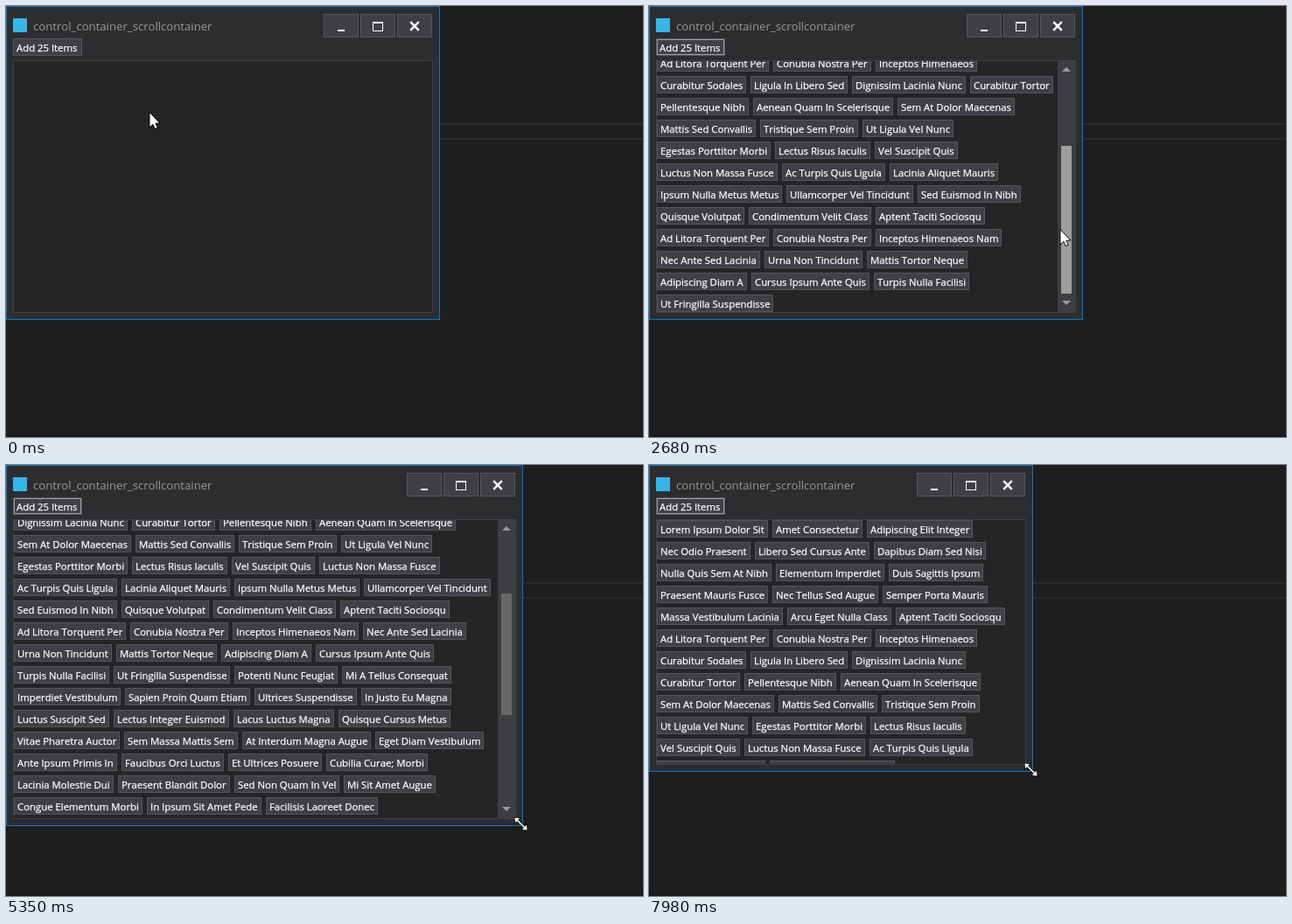
An HTML page with a canvas that plays this animation: 728x493 px, repeating every 8000 ms.

```html
<!DOCTYPE html>
<html lang="en">
<head>
<meta charset="utf-8">
<title>Scroll container</title>
<style>
html, body { margin: 0; width: 100%; height: 100%; overflow: hidden; background: #1e1e1e; }
canvas { display: block; }
</style>
</head>
<body>
<canvas id="stage" width="728" height="493"></canvas>
<script>
const ctx = document.getElementById('stage').getContext('2d');
const LOOP = 8000, STEP = 40, GAP = 5, HEIGHT = 20, ROW = HEIGHT + GAP, LEFT = 9, TOP = 63;
const GRIP = 3; // distance from the resize pointer to the window corner
const VIEW = 287; // list height before resizing
const LABEL = 11.35;
const FACE = '"Open Sans", "Noto Sans", sans-serif';
const C = {
  desk: '#1e1e1e', frame: '#2d2d30', panel: '#252526', face: '#3f3f46', edge: '#54545c',
  hover: '#54545c', hoverEdge: '#6a6a75', accent: '#007acc', bar: '#3e3e42'
};
ctx.fontKerning = 'none';

const setFont = px => { ctx.font = `${px}px ${FACE}`; };
setFont(LABEL);
const items = `Lorem Ipsum Dolor Sit,Amet Consectetur,Adipiscing Elit Integer,Nec Odio Praesent,
Libero Sed Cursus Ante,Dapibus Diam Sed Nisi,Nulla Quis Sem At Nibh,Elementum Imperdiet,
Duis Sagittis Ipsum,Praesent Mauris Fusce,Nec Tellus Sed Augue,Semper Porta Mauris,
Massa Vestibulum Lacinia,Arcu Eget Nulla Class,Aptent Taciti Sociosqu,Ad Litora Torquent Per,
Conubia Nostra Per,Inceptos Himenaeos,Curabitur Sodales,Ligula In Libero Sed,
Dignissim Lacinia Nunc,Curabitur Tortor,Pellentesque Nibh,Aenean Quam In Scelerisque,
Sem At Dolor Maecenas,Mattis Sed Convallis,Tristique Sem Proin,Ut Ligula Vel Nunc,
Egestas Porttitor Morbi,Lectus Risus Iaculis,Vel Suscipit Quis,Luctus Non Massa Fusce,
Ac Turpis Quis Ligula,Lacinia Aliquet Mauris,Ipsum Nulla Metus Metus,
Ullamcorper Vel Tincidunt,Sed Euismod In Nibh,Quisque Volutpat,Condimentum Velit Class,
Aptent Taciti Sociosqu,Ad Litora Torquent Per,Conubia Nostra Per,Inceptos Himenaeos Nam,
Nec Ante Sed Lacinia,Urna Non Tincidunt,Mattis Tortor Neque,Adipiscing Diam A,
Cursus Ipsum Ante Quis,Turpis Nulla Facilisi,Ut Fringilla Suspendisse,Potenti Nunc Feugiat,
Mi A Tellus Consequat,Imperdiet Vestibulum,Sapien Proin Quam Etiam,Ultrices Suspendisse,
In Justo Eu Magna,Luctus Suscipit Sed,Lectus Integer Euismod,Lacus Luctus Magna,
Quisque Cursus Metus,Vitae Pharetra Auctor,Sem Massa Mattis Sem,At Interdum Magna Augue,
Eget Diam Vestibulum,Ante Ipsum Primis In,Faucibus Orci Luctus,Et Ultrices Posuere,
Cubilia Curae; Morbi,Lacinia Molestie Dui,Praesent Blandit Dolor,Sed Non Quam In Vel,
Mi Sit Amet Augue,Congue Elementum Morbi,In Ipsum Sit Amet Pede,
Facilisis Laoreet Donec`.split(/,\s*/).map(label => (
  { label, w: Math.round(ctx.measureText(label).width) + 8 }
));

// Pointer moves: start, end, destination
const moves = [
  [0, 0, 164, 122],
  [30, 350, 36, 45],
  [1410, 2010, 479, 146],
  [2060, 2180, 479, 150],
  [2220, 2500, 470, 256],
  [2720, 3340, 36, 45],
  [3880, 4300, 505, 371],
  [4340, 4610, 483, 348],
  [4740, 4740, 493, 356],
  [5070, 5750, 721, 485],
  [6020, 6060, 721, 483],
  [6300, 6500, 650, 390],
  [6660, 6940, 695, 480],
  [7140, 7390, 721, 483],
  [7580, 7980, 436, 348]
];
const smooth = u => u * u * (3 - 2 * u);
const within = (t, a, b) => t >= a && t < b;
const clamp = (v, lo, hi) => Math.min(hi, Math.max(lo, v));

function pointerAt(t) {
  const i = moves.filter(m => m[0] <= t).length - 1;
  const [start, end, ...to] = moves[i];
  const from = moves[Math.max(0, i - 1)].slice(2);
  const steps = Math.floor((t - start) / STEP) + 1;
  const u = smooth(Math.min(1, steps * STEP / (end - start + STEP)));
  return to.map((v, n) => Math.round(from[n] + (v - from[n]) * u));
}

function layout(count, limit) {
  let x = LEFT, row = 0;
  const cells = items.slice(0, count).map(item => {
    if (x > LEFT && x + item.w > limit) { x = LEFT; row++; }
    const cell = { ...item, x, y: TOP + row * ROW };
    x += item.w + GAP;
    return cell;
  });
  return { cells, height: (row + 1) * ROW - GAP };
}

function state(t) {
  const [x, y] = pointerAt(t);
  const resizeTime = t < 5070 ? 5030 : within(t, 6300, 7580) ? 6260 : t;
  const [w, h] = pointerAt(resizeTime).map(v => v + GRIP);
  const count = 25 * [600, 1180, 3640].filter(added => t >= added).length;
  const bar = within(t, 1180, 6420);
  const kind = t < 4740 || within(t, 6300, 6860) ? 'arrow' : within(t, 6860, 7140) ? 'vertical' : 'diagonal';
  const dragY = pointerAt(Math.min(t, 2640))[1];
  const offset = t < 2060 || !bar ? 0 : Math.round(clamp((dragY - 146) * 1.69, 0, 133));
  return {
    t, x, y, w, h, count, bar, kind, offset,
    drag: within(t, 2050, 2680),
    pressed: within(t, 520, 600) || within(t, 1060, 1180) || within(t, 3560, 3640),
    focused: t >= 520
  };
}

function fill(x, y, w, h, color) {
  ctx.fillStyle = color;
  ctx.fillRect(x, y, w, h);
}
function box(x, y, w, h, color, edge) {
  fill(x, y, w, h, edge);
  fill(x + 1, y + 1, w - 2, h - 2, color);
}
function text(s, x, y, px, color) {
  setFont(px);
  ctx.fillStyle = color;
  ctx.fillText(s, x, y);
}
// A hairline keeps small white text bright
function label(s, x, y) {
  text(s, x, y, LABEL, '#fff');
  ctx.strokeStyle = '#fff';
  ctx.lineWidth = 0.25;
  ctx.strokeText(s, x, y);
}
function poly(points, color, outline) {
  ctx.beginPath();
  points.forEach(([x, y]) => ctx.lineTo(x, y));
  ctx.closePath();
  if (outline) {
    ctx.strokeStyle = outline;
    ctx.lineWidth = 1.6;
    ctx.stroke();
  }
  ctx.fillStyle = color;
  ctx.fill();
}

function over(s, x, y, w, h) {
  return s.kind === 'arrow' && !s.drag && within(s.x, x, x + w) && within(s.y, y, y + h);
}
function button(s, x, y, w, h) {
  const hot = over(s, x, y, w, h);
  box(x, y, w, h, hot ? C.hover : C.face, hot ? C.hoverEdge : C.edge);
}

function drawDesk() {
  fill(0, 0, 728, 493, C.desk);
  fill(0, 134, 728, 2, '#2a2a2c');
  fill(0, 151, 728, 2, '#2a2a2c');
  fill(0, 490, 728, 3, '#1a1a1b');
}

function drawFrame(s) {
  const { w, h } = s;
  box(0, 0, w, h, C.frame, C.accent);
  fill(8, 14, 16, 16, '#35b5e8');
  text('control_container_scrollcontainer', 31, 28, 13.15, '#999999');

  [133, 91, 49].forEach(d => button(s, w - d, 9, 40, 27));
  fill(w - 117, 27, 8, 2, '#fff');
  ctx.strokeStyle = '#fff';
  ctx.lineWidth = 1;
  ctx.strokeRect(w - 76.5, 18.5, 11, 10);
  fill(w - 77, 18, 12, 2, '#fff');
  ctx.save();
  ctx.translate(w - 29, 23);
  ctx.lineWidth = 2.4;
  ctx.beginPath();
  for (const k of [-1, 1]) {
    ctx.moveTo(-4.8, -4.8 * k);
    ctx.lineTo(4.8, 4.8 * k);
  }
  ctx.stroke();
  ctx.restore();
}

function drawAdd(s) {
  button(s, 8, 37, 79, HEIGHT);
  if (s.pressed) fill(8, 37, 79, HEIGHT, C.accent);
  if (s.focused) {
    ctx.strokeStyle = '#fff';
    ctx.lineWidth = 1;
    ctx.setLineDash([1, 1]);
    ctx.strokeRect(9.5, 38.5, 76, 17);
    ctx.setLineDash([]);
  }
  label('Add 25 Items', 12, 52);
}

function drawBar(s) {
  // The extent is measured before resizing and stays until the list refreshes
  const extent = layout(s.count, 467).height;
  const x = s.w - 29, mid = x + 10, length = s.h - 112;
  fill(x, TOP, 20, s.h - 72, C.bar);
  poly([[mid - 5, 75], [mid, 70], [mid + 5, 75]], '#999');
  poly([[mid - 5, s.h - 22], [mid, s.h - 17], [mid + 5, s.h - 22]], '#999');
  const y = Math.round(82 + s.offset / extent * length);
  const size = Math.round(VIEW / extent * length);
  const hot = over(s, x + 3, y, 13, size);
  fill(x + 4, y, 12, size, s.drag ? '#efebef' : hot ? '#9e9e9e' : '#686868');
}

function drawList(s) {
  const limit = s.w - (s.bar ? 29 : 9);
  box(8, 62, s.w - 16, s.h - 70, C.panel, C.face);
  ctx.save();
  ctx.beginPath();
  ctx.rect(LEFT, TOP, limit - LEFT, s.h - 72);
  ctx.clip();
  for (const c of layout(s.count, limit).cells) {
    const y = c.y - s.offset;
    button(s, c.x, y, c.w, HEIGHT);
    label(c.label, c.x + 4, y + 15);
  }
  ctx.restore();
  if (s.bar) drawBar(s);
}

function doubleArrow(half, head, wing) {
  const side = [[0, -half], [wing, head - half], [0.8, head - half]];
  const right = [...side, ...side.map(([x, y]) => [x, -y]).reverse()];
  return [...right, ...right.map(([x, y]) => [-x, y]).reverse()];
}
function drawPointer({ x, y, kind }) {
  ctx.save();
  ctx.translate(x + 0.5, y + 0.5);
  if (kind === 'arrow') {
    poly([[0, 0], [0, 15.5], [3.6, 12.2], [6, 17.6], [8.2, 16.6], [5.8, 11.4], [10.4, 11]], '#fff', '#000');
  } else {
    if (kind === 'diagonal') ctx.rotate(-Math.PI / 4);
    poly(doubleArrow(10, 4.5, 3.6), '#fff', '#000');
  }
  ctx.restore();
}

function frame() {
  const s = state(performance.now() % LOOP);
  drawDesk();
  drawFrame(s);
  drawAdd(s);
  drawList(s);
  drawPointer(s);
  requestAnimationFrame(frame);
}
frame();
</script>
</body>
</html>
```
